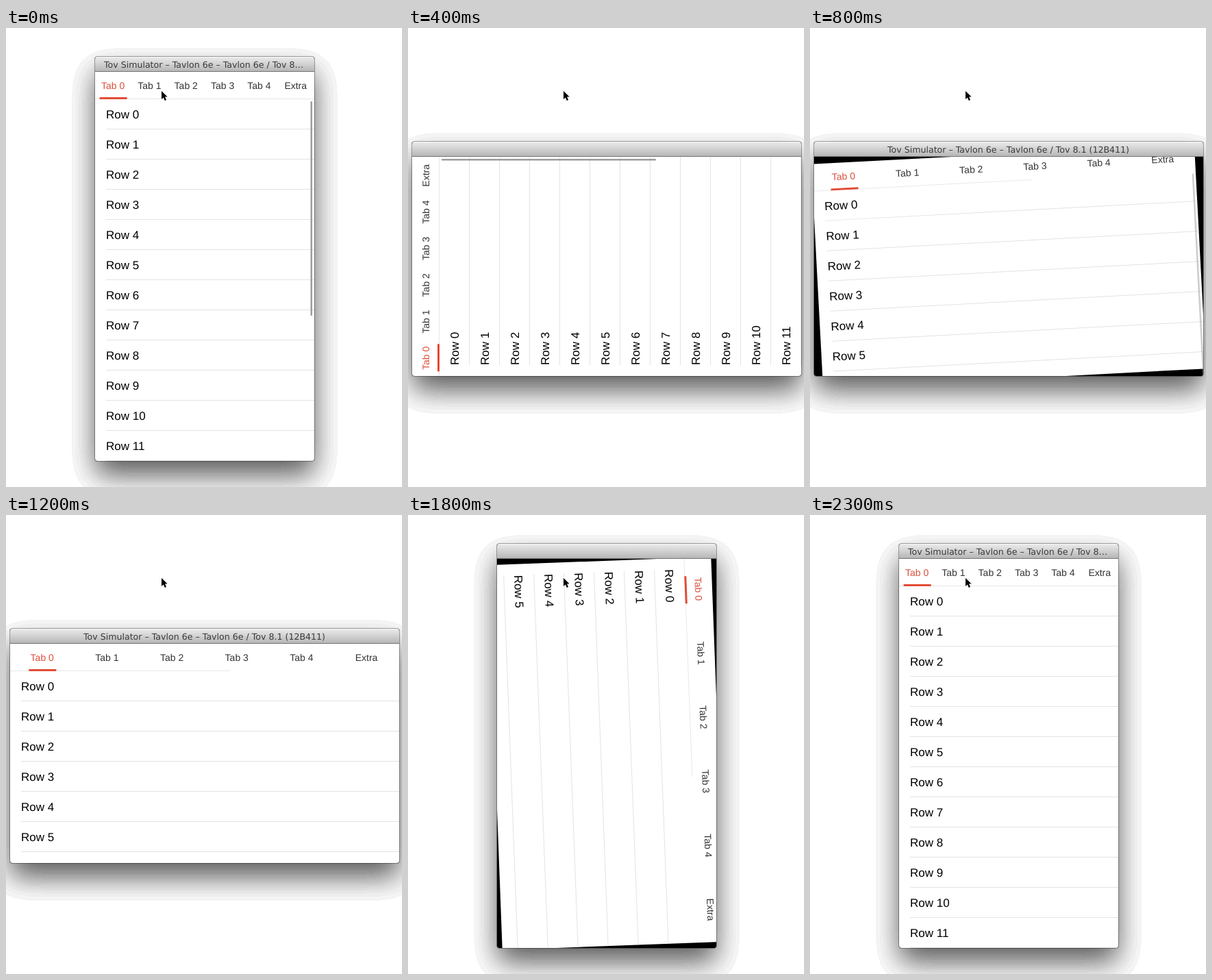
These frames come from a looping animation (578 px wide and 670 px high, 2.4 s). An HTML page:

```html
<!DOCTYPE html>
<html lang="en">
<head>
<meta charset="utf-8">
<title>Rotating tab view</title>
<style>
  html, body { margin: 0; width: 100%; height: 100%; overflow: hidden; background: #fff; }
  svg { display: block; width: 578px; height: 670px; }
  text { text-rendering: geometricPrecision; }
  .title { font: 12.6px "DejaVu Sans", sans-serif; fill: #3a3a3a; text-anchor: middle; }
  .tab { font: 14px "Liberation Sans", Arial, sans-serif; fill: #333; text-anchor: middle; }
  .tab.on { fill: #db503d; }
  .row { font: 17px "Liberation Sans", Arial, sans-serif; fill: #000; }
</style>
</head>
<body>
<svg id="stage" viewBox="0 0 578 670">
  <defs>
    <linearGradient id="chrome" x1="0" y1="0" x2="0" y2="1">
      <stop offset="0" stop-color="#ececec"/>
      <stop offset="1" stop-color="#b4b4b4"/>
    </linearGradient>
    <filter id="soft" filterUnits="userSpaceOnUse" x="-120" y="-60" width="820" height="860">
      <feGaussianBlur in="SourceAlpha" stdDeviation="20.5"/>
      <feComponentTransfer><feFuncA id="bands" type="discrete"/></feComponentTransfer>
    </filter>
    <clipPath id="shape"><rect id="shapeBox" rx="4"/></clipPath>
  </defs>
  <g id="win">
    <g filter="url(#soft)"><rect id="shadow" rx="4" fill-opacity=".64"/></g>
    <rect id="edge" rx="4.5" fill="#000" fill-opacity=".35"/>
    <g clip-path="url(#shape)">
      <rect id="back" fill="#000"/>
      <g id="view"></g>
      <rect id="bar" height="22" fill="url(#chrome)"/>
      <rect id="shine" height="1" fill="#f6f6f6"/>
      <rect id="rim" height="1" fill="#757575"/>
    </g>
    <text id="title" class="title"></text>
  </g>
  <path transform="translate(227 92)" d="M0 0V12L2.8 9.4L4.8 14L7 13L5 8.6H8.6Z"
    fill="#000" stroke="#fff" stroke-width="1.6" stroke-linejoin="round" paint-order="stroke"/>
</svg>
<script>
const LOOP = 2400, STEP = 100, TURN = 400;
const SHORT = 320, LONG = 568, BAR = 22, CX = 290, CY = 348;
const TITLE = "Tov Simulator – Tavlon 6e – Tavlon 6e / Tov 8.1 (12B411)";
const TITLE_CUT = "Tov Simulator – Tavlon 6e – Tavlon 6e / Tov 8…";

const $ = id => document.getElementById(id);
const set = (el, attrs) => {
  for (const k in attrs) el.setAttribute(k, attrs[k]);
  return el;
};
const view = $("view");
const add = (tag, attrs, text = "") => {
  const el = set(document.createElementNS("http://www.w3.org/2000/svg", tag), attrs);
  el.textContent = text;
  return view.appendChild(el);
};
const box = (x, y, width, height) => ({ x, y, width, height });
const mix = (a, b, p) => a + (b - a) * p;
const clamp = v => Math.min(1, Math.max(0, v));

// The shadow falls off in flat bands.
$("bands").setAttribute("tableValues",
  Array.from({ length: 40 }, (_, k) => k ? k / 40 + 0.02 : 0).join(" "));

const paper = add("rect", { fill: "#fff" });
const lines = [];
for (let i = 0; i < 20; i++) {
  const y = 40 + i * 44;
  add("text", { class: "row", x: 16, y: y + 28 }, "Row " + i);
  lines.push(add("rect", { x: 16, y: y + 43, height: 1, fill: "#e3e3e4" }));
}
add("rect", { ...box(0, 39, SHORT, 1), fill: "#e8e8e8" });
const tabs = ["Tab 0", "Tab 1", "Tab 2", "Tab 3", "Tab 4", "Extra"].map((name, i) =>
  add("text", { class: i ? "tab" : "tab on", y: 25 }, name));
const mark = add("rect", { y: 37, width: 40, height: 3, fill: "#e24b34" });
const scroll = add("rect", { y: 43, width: 2.5, height: 313, rx: 1.25, fill: "#9c9c9c" });

function drawView(w, h, angle, scrollAlpha) {
  set(view, { transform: `translate(${CX} ${CY}) rotate(${angle}) translate(${-w / 2} ${-h / 2})` });
  set(paper, box(0, 0, w, h));
  lines.forEach((line, i) => set(line, {
    width: w - 16,
    visibility: 84 + i * 44 <= h ? "visible" : "hidden"
  }));
  tabs.forEach((tab, i) => set(tab, { x: w * (i + 0.5) / 6 - 0.6 }));
  set(mark, { x: w / 12 - 20 });
  set(scroll, { x: w - 5.5, opacity: scrollAlpha });
}

function drawWindow(w, h, title) {
  const x = CX - w / 2, y = CY - h / 2 - BAR, full = h + BAR;
  set($("shadow"), box(x, y + 21, w, full));
  set($("edge"), box(x - 1, y - 1, w + 2, full + 2));
  set($("shapeBox"), box(x, y, w, full));
  set($("back"), box(x, y, w, full));
  set($("bar"), { x, y, width: w });
  set($("shine"), { x, y, width: w });
  set($("rim"), { x, y: y + BAR - 1, width: w });
  set($("title"), { x: w === LONG ? 289.5 : 288.5, y: y + 16 });
  $("title").textContent = title;
}

function turned(t, start) {
  const s = clamp((t - start) / TURN);
  return s * s * (3 - 2 * s);
}

function draw(t) {
  const wide = t >= 400 && t < 1700;
  const hidden = t >= 1700 && t < 1800;
  const untitled = t === 400 || t === 1800;
  $("win").setAttribute("visibility", hidden ? "hidden" : "visible");
  view.setAttribute("display", hidden ? "none" : "inline");
  if (hidden) return;

  const p = wide ? turned(t, 444) : t < 400 ? 1 : turned(t, 1763);
  const w = wide ? LONG : SHORT, h = wide ? SHORT : LONG;
  const scrollAlpha = t < 1700 ? clamp((1000 - t) / 400) : 0;
  drawWindow(w, h, untitled ? "" : wide ? TITLE : TITLE_CUT);
  drawView(mix(h, w, p), mix(w, h, p), (wide ? -90 : 90) * (1 - p), scrollAlpha);
}

function tick() {
  draw(Math.floor(performance.now() % LOOP / STEP) * STEP);
  requestAnimationFrame(tick);
}
tick();
</script>
</body>
</html>
```
